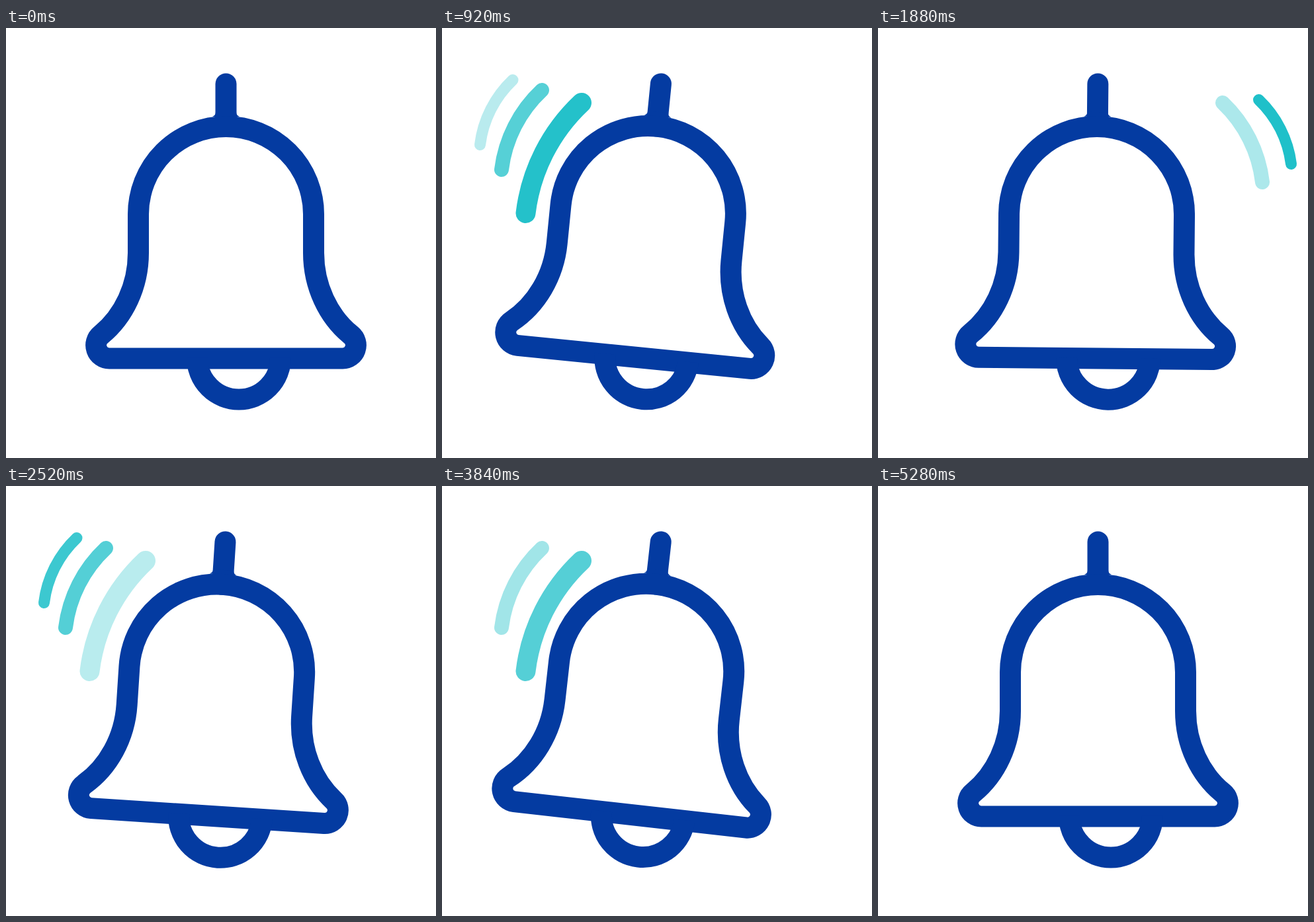
An HTML page for the animation above (5320 ms loop, 650 by 650 pixels).

```html
<!DOCTYPE html>
<html lang="en">
<head>
<meta charset="utf-8">
<title>Ringing bell</title>
<style>
  html, body { margin: 0; width: 100%; height: 100%; overflow: hidden; background: #fff; }
  svg { display: block; width: 100vw; height: 100vh; }
</style>
</head>
<body>
<svg viewBox="0 0 650 650" fill="none" stroke-linecap="round">
  <g id="bell" stroke="#043ba1" stroke-width="32">
    <path d="M332.5 84.5V149"/>
    <path d="M312 134Q317 132 317 127H348Q348 132 353 134Z" fill="#043ba1" stroke="none"/>
    <path d="M143.5 464C178 436 200 390 200 340V281.5A132.5 132.5 0 0 1 465 281.5V340C465 390 487 436 521.5 464A20 20 0 0 1 509 499.5H156A20 20 0 0 1 143.5 464Z"/>
    <path d="M289 498.5A63 63 0 0 0 415 498.5" stroke-linecap="butt"/>
  </g>
  <g id="waves" stroke="#17bec7"></g>
</svg>
<script>
const LOOP = 5320, STEP = 40;
const HALF = 746, FIRST = 775, LAST = FIRST + 5 * HALF, REST = 5285;
const LEFT = 6.75, RIGHT = -5;

// Each wave: path, stroke width, first peak time, rise and fall durations
const waves = [
  ['M126.5 280A274 274 0 0 1 211 113', 30, FIRST + 135, 200, 168],
  ['M90 214A197 197 0 0 1 151 94', 22, FIRST + 200, 200, 200],
  ['M57.5 176.5A162 162 0 0 1 107 78.5', 17, FIRST + 285, 200, 200],
  ['M451 123A274 274 0 0 1 536.5 290.5', 29, FIRST + HALF + 100, 240, 215],
  ['M521 113A197 197 0 0 1 581 233', 22, FIRST + HALF + 230, 200, 200],
  ['M575.5 108.5A162 162 0 0 1 624.5 205.5', 17, FIRST + HALF + 352, 200, 200]
].map(([d, width, peak, rise, fall]) => {
  const el = document.createElementNS('http://www.w3.org/2000/svg', 'path');
  el.setAttribute('d', d);
  el.setAttribute('stroke-width', width);
  document.getElementById('waves').append(el);
  return { el, peak, rise, fall };
});

const bell = document.getElementById('bell');

function ease(from, to, p) {
  return from + (to - from) * (1 - Math.cos(Math.PI * Math.min(p, 1))) / 2;
}

function angle(t) {
  if (t < FIRST) return ease(0, LEFT, t / FIRST);
  if (t > LAST) return ease(RIGHT, 0, (t - LAST) / (REST - LAST));
  const mid = (LEFT + RIGHT) / 2;
  return mid + (LEFT - mid) * Math.cos(Math.PI * (t - FIRST) / HALF);
}

// Three pulses per wave, one for each full swing
function opacity(t, { peak, rise, fall }) {
  let best = 0;
  for (let i = 0; i < 3; i++) {
    const d = t - peak - i * 2 * HALF;
    best = Math.max(best, 1 - (d < 0 ? -d / rise : d / fall));
  }
  return best;
}

function draw(now) {
  const t = Math.floor((now % LOOP) / STEP) * STEP;
  bell.setAttribute('transform', `rotate(${angle(t)} 332.5 68.5)`);
  for (const w of waves) w.el.setAttribute('opacity', opacity(t, w));
}

let start;
function tick(now) {
  start ??= now;
  draw(now - start);
  requestAnimationFrame(tick);
}
draw(0);
requestAnimationFrame(tick);
</script>
</body>
</html>
```
